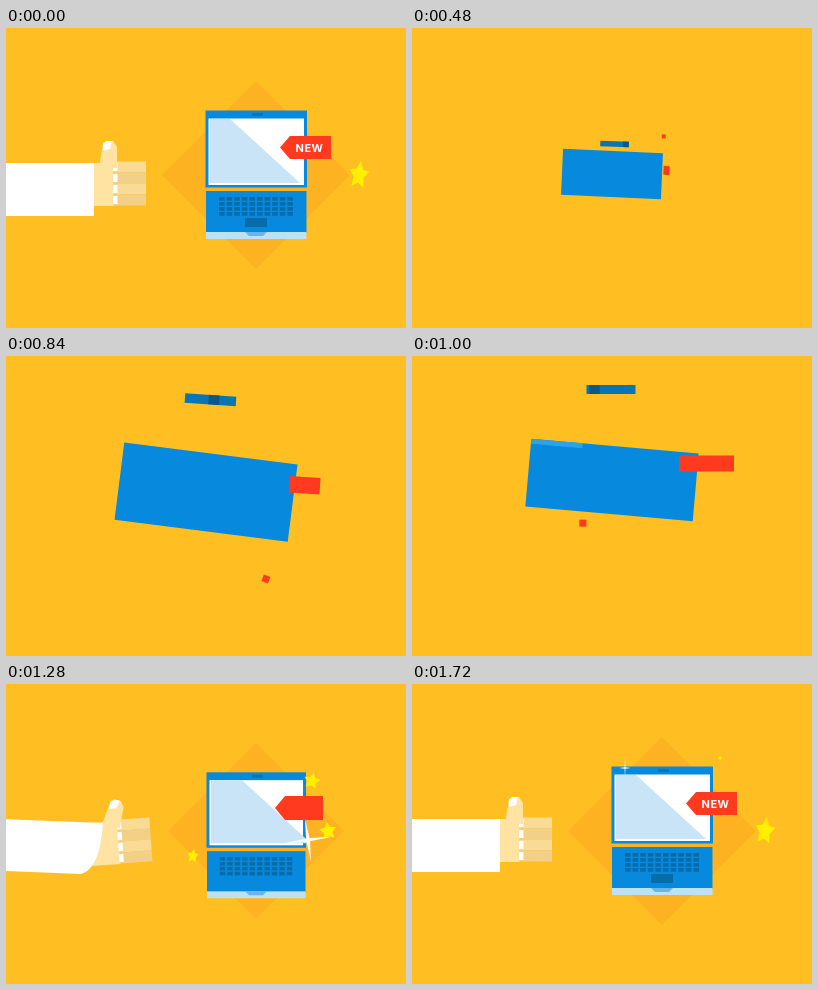
These frames come from a looping animation (400x300 px, 1.76 s). An HTML page with a canvas:

```html
<!DOCTYPE html>
<html lang="en">
<head>
<meta charset="utf-8">
<title>New laptop</title>
<style>
  html, body { margin: 0; width: 100%; height: 100%; overflow: hidden; background: #ffbf22; }
  canvas { display: block; width: 100vw; height: 100vh; }
</style>
</head>
<body>
<canvas id="stage" width="400" height="300"></canvas>
<script>
const LOOP = 1760, STEP = 40, REVEAL = 1160;
const ctx = document.getElementById('stage').getContext('2d');
const C = {
  bg: '#ffbf22', diamond: '#fdb321', blue: '#0789de', dark: '#0876b5', darker: '#0a5884',
  key: '#086cab', strip: '#2ba2ea', pale: '#bfe0ee', notch: '#6bb4e4', screen: '#c9e4f6',
  red: '#ff3a1e', star: '#fff000', skin: '#fee3a2', tan: '#fadb95', tan2: '#f2d088', white: '#fff'
};

const mix = (a, b, p) => a + (b - a) * p;
const ramp = (t, from, to) => Math.min(1, Math.max(0, (t - from) / (to - from)));
const ease = (t, from, to) => {
  const p = ramp(t, from, to);
  return p * p * (3 - 2 * p);
};
const rad = deg => deg * Math.PI / 180;

function place(x, y, deg, sx, sy, draw) {
  ctx.save();
  ctx.translate(x, y);
  ctx.rotate(rad(deg));
  ctx.scale(sx, sy);
  draw();
  ctx.restore();
}

function rect(color, x, y, w, h) {
  ctx.fillStyle = color;
  ctx.fillRect(x, y, w, h);
}

function poly(color, ...pts) {
  ctx.fillStyle = color;
  ctx.beginPath();
  for (let i = 0; i < pts.length; i += 2) ctx.lineTo(pts[i], pts[i + 1]);
  ctx.fill();
}

function box(color, x, y, w, h, deg) {
  place(x, y, deg, 1, 1, () => rect(color, -w / 2, -h / 2, w, h));
}

function spikes(color, count, inner) {
  const pts = [];
  for (let i = 0; i < count * 2; i++) {
    const r = i % 2 ? inner : 1, a = i * Math.PI / count;
    pts.push(r * Math.sin(a), -r * Math.cos(a));
  }
  poly(color, ...pts);
}

function drawBlocks(t) {
  const enter = ease(t, 80, 240), follow = ease(t, 120, 260), drop = ease(t, 200, 300);
  const zoom = ease(t, 520, 640), turn = ease(t, 700, 1000), fold = ease(t, 1000, 1140);
  const lean = 2.5 * ease(t, 280, 480) + 6.5 * zoom - 4 * turn - 4 * fold;
  const upright = lean * (1 - turn);

  // main block with the lid opening along its top edge
  const w = 150 - 50 * enter + 80 * zoom - 12 * turn - 56 * fold;
  const h = 46 + 40 * zoom - 18 * turn - 18 * fold;
  const open = ease(t, 930, 1120);
  place(mix(-106, 200, enter) + 40 * fold, 146 - 22 * turn + 56 * fold, lean, 1, 1, () => {
    rect(C.blue, -w / 2, -h / 2, w, h);
    if (open) rect(C.strip, -w / 2, -h / 2 - 75 * fold, w * open, 5 + 75 * fold);
  });

  // bar whose dark end slides from right to left
  const barW = 28.5 + 24.5 * zoom - 4 * turn - 30 * fold, barH = 5.5 + 4.5 * zoom - turn;
  const barY = mix(-10, 116, drop) - 28 * zoom - 54.5 * turn - 20 * Math.sin(Math.PI * turn) + 52 * fold;
  place(202.5 + 6.5 * zoom - 10 * turn + 51 * fold, barY, upright, 1, 1, () => {
    rect(C.dark, -barW / 2, -barH / 2, barW, barH);
    rect(C.darker, barW * mix(0.29, -0.44, turn), -barH / 2, barW * 0.21, barH);
  });

  // red piece that stretches into the tag
  box(C.red, mix(-64, 254.5, follow) + 47.5 * zoom - 7.5 * turn,
    142.5 + 4.5 * zoom - 39.5 * turn + 14 * fold,
    mix(71, 6, follow) + 5 * zoom + 44 * turn, 9 + 8 * zoom - turn + 6 * fold, upright);

  // small square orbiting the block
  const orbit = mix(250, 64, drop) + 84 * zoom - 112 * turn - 6 * fold;
  const angle = rad(-36 + 13 * zoom + 167 * turn - 26 * fold);
  const size = 4 + 3 * zoom;
  box(C.red, 200 + orbit * Math.cos(angle), 146 + orbit * Math.sin(angle), size, size, 55 * zoom + 125 * turn);
}

function drawLaptop(grow, drift) {
  const scale = 0.98 + 0.2 * (1 - grow) + 0.02 * drift;
  const edge = 224 + 12 * (1 - drift);
  place(250, 147 + 4.5 * (1 - drift), 0, scale, scale, () => {
    ctx.translate(-250, -147);
    rect(C.blue, 199.5, 82.5, 101.5, 77);
    rect(C.dark, 246, 85, 11, 3);
    rect(C.white, 202.5, 90.5, 95.5, 66.5);
    poly(C.screen, 204, 91, edge, 91, edge + 70, 155, 204, 155);
    rect(C.blue, 200, 163, 100.5, 42);
    for (let row = 0; row < 4; row++)
      for (let col = 0; col < 10; col++)
        rect(C.key, 213 + col * 7.6, 169 + row * 5, 5.6, 3.7);
    if (drift > 0.5) rect(C.key, 239, 190, 22, 9);
    rect(C.pale, 200, 204, 100.5, 7);
    poly(C.notch, 239, 204, 261, 204, 257, 208, 243, 208);
  });
}

function drawTag(t, grow, drift) {
  const x = 288 + 5 * grow + 6.5 * drift, y = 124 - 4.5 * drift;
  const w = 44 + 4 * grow + 3 * drift, h = 24 - drift;
  const l = x - w / 2, r = x + w / 2, top = y - h / 2, bottom = y + h / 2;
  poly(C.red, l, y, l + 10, top, r, top, r, bottom, l + 10, bottom);
  if (t < 1400) return;
  ctx.fillStyle = C.white;
  ctx.font = '700 11px Inter, sans-serif';
  ctx.letterSpacing = '0.5px';
  ctx.textAlign = 'center';
  ctx.fillText('NEW', x + 4, y + 4.3);
}

function drawHand(grow, bend) {
  const x = 5 * bend - 160 * (1 - grow);
  place(88 + x, 156 + 3.5 * bend, -4 * bend, 1, 1, () => {
    ctx.translate(-88, -156);
    rect(C.skin, 80, 135, 28, 43);
    for (let i = 0; i < 4; i++) {
      const y = 133.5 + i * 11;
      rect(i % 2 ? C.tan2 : C.tan, 107, y, 33, 11);
      rect(C.white, 107, y + 1.5, 4.5, 8);
    }
    place(102, 136, 15 * bend + 25 * (1 - grow), 1, 1, () => {
      poly(C.skin, -9, 4, -5, -21, -2, -23, 5, -23, 9, -17, 9, 4);
      poly(C.white, -5, -13, -5, -20, -1, -23, 4, -23, 2, -15);
    });
  });
  place(Math.min(x, 0), 0, 0, 1, 1, () => {
    ctx.fillStyle = C.white;
    ctx.beginPath();
    ctx.moveTo(-10, 135);
    ctx.lineTo(88 + 9 * bend, 135 + 4 * bend);
    ctx.quadraticCurveTo(88 + 6 * bend, 162 + 23 * bend, 88 - 13 * bend, 188 + 2 * bend);
    ctx.lineTo(-10, 188 - 1.5 * bend);
    ctx.fill();
  });
}

function star(x, y, r, squash, deg) {
  place(x, y, deg, r * squash, r, () => spikes(C.star, 5, 0.52));
}

function drawStars(t, grow) {
  const fly = ease(t, 1280, 1480), life = ramp(t, 1280, LOOP), brief = ramp(t, 1280, 1480);
  star(306 + 2 * fly, 97 - 23 * fly, 8.5 * grow * Math.sqrt(1 - life), 1, 12 + 78 * fly);
  star(322 + 31 * fly, 147, 9 * grow + 5.5 * fly, 1 - 0.3 * fly, 16 * fly - 8);
  star(187 - 18 * fly, 172 + 6 * fly, 7.5 * grow * Math.sqrt(1 - brief), 0.8, 8);
}

function twinkle(t, from, to, x, y, w, h, deg) {
  const size = Math.sin(Math.PI * ramp(t, from, to));
  place(x, y, deg, w * size, h * size, () => spikes(C.white, 4, 0.1));
}

function drawReveal(t) {
  const grow = ease(t, 1120, 1270), drift = ease(t, 1280, 1440);
  const r = 30 + 58 * grow + 6 * drift;
  poly(C.diamond, 250, 147 - r, 250 + r, 147, 250, 147 + r, 250 - r, 147);
  drawLaptop(grow, drift);
  drawHand(grow, 1 - drift);
  drawStars(t, grow);
  drawTag(t, grow, drift);
  twinkle(t, 1200, 1360, 302, 156, 25, 22, -8);
  twinkle(t, 1660, LOOP, 213, 84, 6, 11, 0);
}

function draw(t) {
  rect(C.bg, 0, 0, 400, 300);
  // the finished scene holds for the first step, then cuts away
  if (t < STEP) drawReveal(LOOP);
  else if (t < REVEAL) drawBlocks(t);
  else drawReveal(t);
}

const start = performance.now();
function tick() {
  const t = (performance.now() - start) % LOOP;
  draw(Math.floor(t / STEP) * STEP);
  requestAnimationFrame(tick);
}
tick();
</script>
</body>
</html>
```
